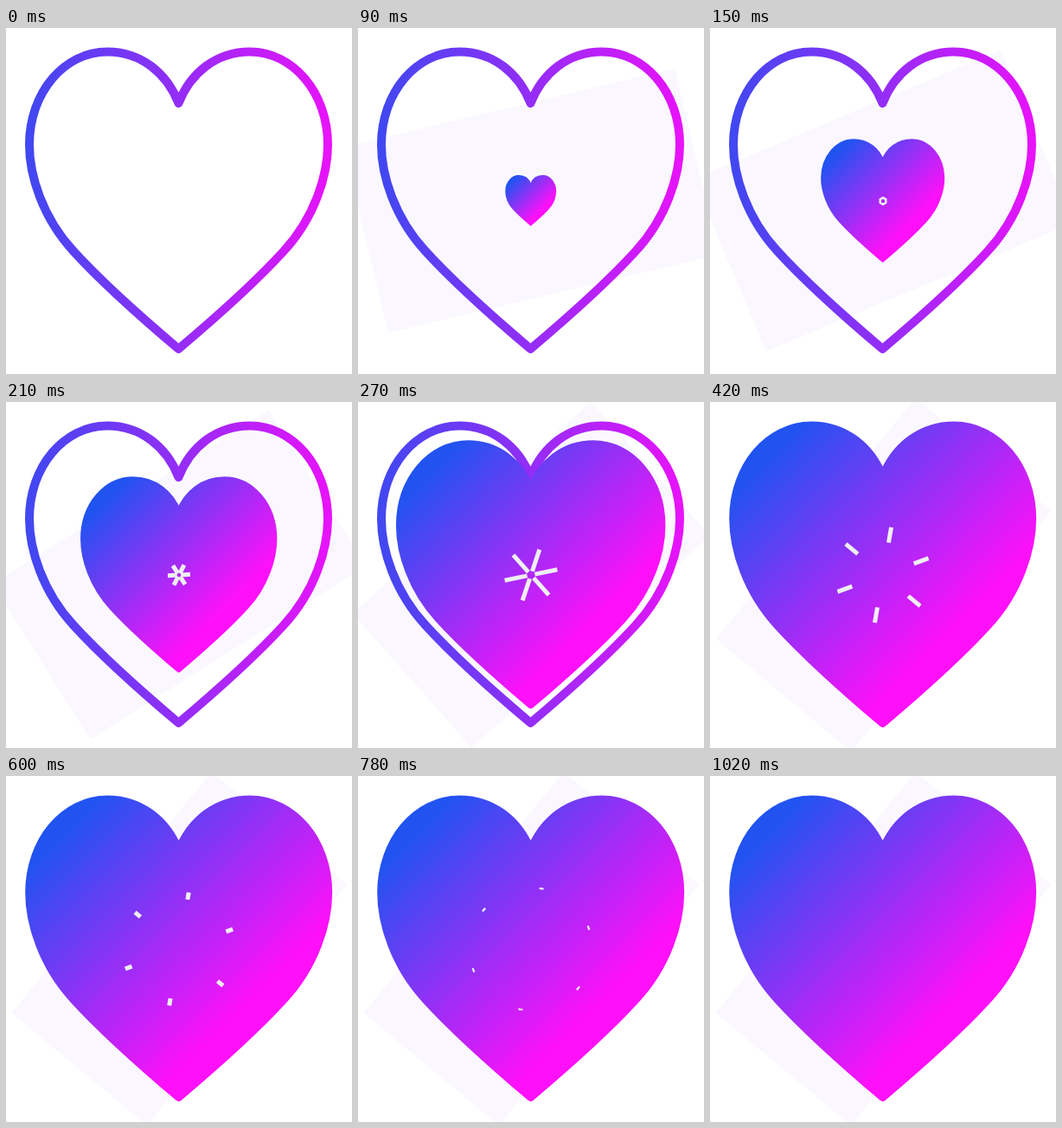
An HTML page for the animation above (1050 ms loop, 400x400 px).

```html
<!DOCTYPE html>
<html lang="en">
<head>
<meta charset="utf-8">
<title>Heart burst</title>
<style>
  html, body { margin: 0; width: 100%; height: 100%; overflow: hidden; background: #fff; }
  svg { display: block; width: 100vw; height: 100vh; }
</style>
</head>
<body>
<svg viewBox="0 0 400 400">
  <defs>
    <linearGradient id="lineInk" gradientUnits="userSpaceOnUse" x1="22" y1="0" x2="377" y2="0">
      <stop stop-color="#3f48f1"/><stop offset="1" stop-color="#e912fb"/>
    </linearGradient>
    <linearGradient id="fillInk" gradientUnits="userSpaceOnUse" x1="65" y1="65" x2="272" y2="272">
      <stop stop-color="#2153f1"/><stop offset="1" stop-color="#ff10f9"/>
    </linearGradient>
    <path id="heart" stroke-width="10" stroke-linejoin="round" d="M199.5 87
      C186 52 156 27.5 117 27.5 C67 27.5 27 75 27 135 C27 170 42 219 78 258 C108 291 151 330 199.5 371
      C248 330 291 291 321 258 C357 219 372 170 372 135 C372 75 332 27.5 282 27.5 C243 27.5 213 52 199.5 87Z"/>
  </defs>
  <rect id="panel" x="-16" y="-9" width="32" height="18" fill="#faf8fe"/>
  <use id="outline" href="#heart" fill="none" stroke="url(#lineInk)"/>
  <use id="filled" href="#heart" fill="url(#fillInk)" stroke="url(#fillInk)"/>
  <path id="burst" fill="none" stroke="#eeeef2" stroke-width="5"/>
</svg>
<script>
const LOOP = 1050, STEP = 30;
const $ = id => document.getElementById(id);
const clamp = (v, lo, hi) => Math.min(hi, Math.max(lo, v));
const show = (el, on) => el.setAttribute('visibility', on ? 'visible' : 'hidden');

// [time, value] keys
const outerKeys = [[120, 2], [150, 4.5], [210, 13], [270, 31], [420, 56], [780, 72], [1020, 75]];
const innerKeys = [[120, 2], [150, 2], [210, 2.2], [270, 4.5], [420, 38], [780, 69.8], [1020, 75]];
const spinKeys = [[120, 0], [150, 0], [210, 3], [270, 11.5], [420, 20.2], [1020, 20.2]];

// Smooth monotone interpolation through the keys
function track(keys, t) {
  const last = keys.length - 1;
  t = clamp(t, keys[0][0], keys[last][0]);
  const slope = i => (keys[i + 1][1] - keys[i][1]) / (keys[i + 1][0] - keys[i][0]);
  const tangent = i => {
    if (i === 0 || i === last) return 0;
    const a = slope(i - 1), b = slope(i);
    return a * b > 0 ? 2 * a * b / (a + b) : 0;
  };
  let i = 0;
  while (i < last - 1 && t > keys[i + 1][0]) i++;
  const h = keys[i + 1][0] - keys[i][0], u = (t - keys[i][0]) / h, v = 1 - u;
  return keys[i][1] * v * v * (1 + 2 * u) + keys[i + 1][1] * u * u * (3 - 2 * u)
    + h * (tangent(i) * u * v * v - tangent(i + 1) * u * u * v);
}

function draw(t) {
  const started = t >= 60;
  const scale = clamp((t - 48) / 253, 0, 1);
  show($('filled'), started);
  show($('outline'), scale < 1);
  $('filled').setAttribute('transform', `translate(199.7 199.5) scale(${scale}) translate(-199.5 -199.5)`);

  const turn = Math.min(t, 325);
  const size = (202.5 - 0.0665 * turn) / 16;
  show($('panel'), started);
  $('panel').setAttribute('transform',
    `translate(200.5 199.7) rotate(${-0.157 * (turn - 5)}) scale(${size})`);

  const inner = track(innerKeys, t), outer = track(outerKeys, t), spin = track(spinKeys, t);
  let d = '';
  for (let k = 0; k < 6; k++) {
    const a = (k * 60 - spin) * Math.PI / 180;
    const at = r => `${200 + r * Math.cos(a)} ${200 + r * Math.sin(a)}`;
    d += `M${at(inner)}L${at(outer)}`;
  }
  $('burst').setAttribute('d', d);
  show($('burst'), t > 120 && t < 1020);
}

function tick() {
  const t = performance.now() % LOOP;
  draw(Math.floor(t / STEP) * STEP);
  requestAnimationFrame(tick);
}
tick();
</script>
</body>
</html>
```
